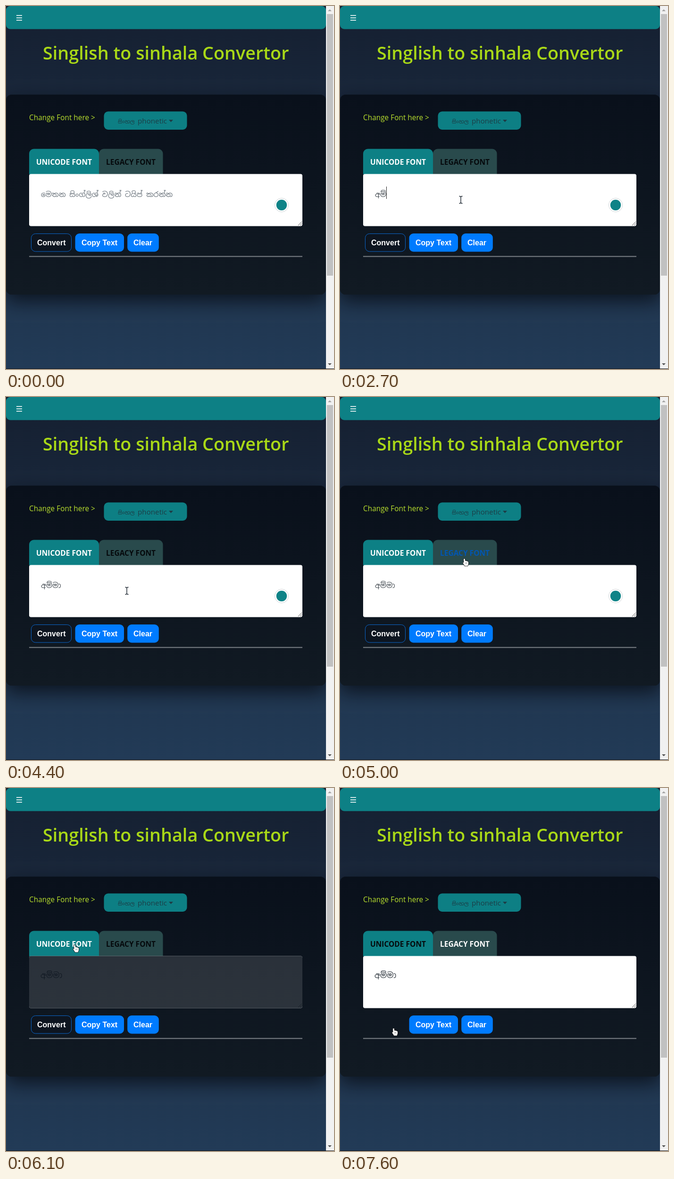
Animation of 695 by 766 pixels, one loop 8000 ms. Source, as an HTML page with a canvas:

```html
<!DOCTYPE html>
<html lang="en">
<head>
<meta charset="utf-8">
<title>Singlish to sinhala Convertor</title>
<style>
html, body { margin: 0; width: 100%; height: 100%; overflow: hidden; background: #16202f; }
canvas { display: block; width: 695px; height: 766px; }
</style>
</head>
<body>
<canvas id="stage" width="695" height="766"></canvas>
<script>
const ctx = document.getElementById('stage').getContext('2d');
const LOOP = 8000, STEP = 100;
const SANS = '"Open Sans", "Noto Sans", sans-serif';
const ARIAL = '"Liberation Sans", Arial, sans-serif';
const SINHALA = '"Noto Sans Sinhala", "Noto Sans", sans-serif';
const TEAL = '#0d8085', BLUE = '#007bff';
const CARD = vertical(187, 609, '#09101b', '#111a23');

// Pointer stops: time, x, y; straight eased moves between them
const PATH = [
  [500, 352, 742], [600, 340, 690], [800, 336, 672], [1100, 259, 414], [1600, 256, 409],
  [4400, 256, 409], [5000, 265, 349], [5500, 265, 349], [5800, 147, 339],
  [6200, 147, 339], [6800, 117, 511], [6900, 115, 515], [8000, 115, 515]
];
const TYPED = [[2600, 'අ'], [2700, 'අම්'], [3000, 'අම්ම්'], [3200, 'අම්ම'], [3400, 'අම්මා']];
const SWITCHES = [[5300, 'legacy'], [6000, 'unicode'], [7400, 'legacy']];
const CLICKED = 2200, FADE_OUT = 114, FADE_IN = 86;

const last = (list, t) => list.filter(e => e[0] <= t).pop();

function rect(x, y, w, h, r, fill, stroke) {
  ctx.beginPath();
  ctx.roundRect(x, y, w, h, r);
  if (fill) { ctx.fillStyle = fill; ctx.fill(); }
  if (stroke) { ctx.strokeStyle = stroke; ctx.lineWidth = 1; ctx.stroke(); }
}

function circle(x, y, r, fill, stroke) {
  rect(x - r, y - r, 2 * r, 2 * r, r, fill, stroke);
}

function text(str, x, y, font, color) {
  ctx.font = font;
  ctx.fillStyle = color;
  ctx.fillText(str, x, y);
  return ctx.measureText(str).width;
}

function poly(points, fill) {
  ctx.beginPath();
  points.forEach(([x, y]) => ctx.lineTo(x, y));
  ctx.closePath();
  ctx.fillStyle = fill;
  ctx.fill();
}

function line(x1, y1, x2, y2, color, width) {
  ctx.beginPath();
  ctx.moveTo(x1, y1);
  ctx.lineTo(x2, y2);
  ctx.strokeStyle = color;
  ctx.lineWidth = width;
  ctx.stroke();
}

function vertical(y1, y2, a, b) {
  const g = ctx.createLinearGradient(0, y1, 0, y2);
  g.addColorStop(0, a);
  g.addColorStop(1, b);
  return g;
}

function page() {
  ctx.fillStyle = vertical(0, 766, '#151f30', '#223b57');
  ctx.fillRect(0, 0, 695, 766);

  ctx.save();
  ctx.shadowColor = 'rgba(5, 10, 18, 0.75)';
  ctx.shadowBlur = 38;
  ctx.shadowOffsetY = 14;
  rect(0, 187, 678, 422, 12, '#0b121d');
  ctx.restore();
  rect(0, 187, 678, 422, 12, CARD);

  rect(0, 0, 678, 48.7, 9, TEAL);
  for (const y of [20, 25, 30]) line(22, y, 34, y, '#fff', 1.6);
  text('Singlish to sinhala Convertor', 78, 113, '600 37.75px ' + SANS, '#a9d817');
  text('Change Font here >', 49, 241, '15.4px ' + SANS, '#b9e02e');

  rect(207.5, 222.5, 176, 38.5, 9, '#0d7f84');
  text('සිංහල', 237, 248, '11.5px ' + SINHALA, '#1d3c45');
  text('phonetic', 279, 248, '15.2px ' + SANS, '#1d3c45');
  poly([[345, 240], [354, 240], [349.5, 245]], '#1d3c45');

  line(49, 528.5, 628, 528.5, '#7b8086', 2);
}

function scrollbar() {
  ctx.fillStyle = '#f1f1f1';
  ctx.fillRect(678, 0, 17, 766);
  ctx.fillStyle = '#c1c1c1';
  ctx.fillRect(680, 17, 13, 552);
  poly([[682, 11], [690, 11], [686, 7]], '#a3a3a3');
  poly([[682, 754], [690, 754], [686, 758]], '#505050');
  ctx.fillStyle = '#10151c';
  ctx.fillRect(0, 765, 695, 1);
}

function tabs(tab, hover) {
  rect(49, 301.6, 148, 53.4, [10, 10, 0, 0], TEAL);
  rect(197, 301.6, 135.5, 53.4, [10, 10, 0, 0], '#294a4c');
  const color = name => tab === name ? '#fff' : hover === name ? '#0056b3' : '#05090c';
  text('UNICODE FONT', 64, 335, 'bold 15.5px ' + SANS, color('unicode'));
  text('LEGACY FONT', 212, 335, 'bold 15.5px ' + SANS, color('legacy'));
}

function unicodeText(t) {
  const font = '15.5px ' + SINHALA;
  const typed = last(TYPED, t);
  let w = 0;
  if (typed) w = text(typed[1], 74, 403, font, '#495057');
  else text('මෙතන සිංග්ලිශ් වලින් ටයිප් කරන්න', 74, 403, font, '#6c757d');
  const since = t - (typed ? typed[0] : CLICKED);
  if (t >= CLICKED && t < SWITCHES[0][0] && since % 1060 < 530) {
    ctx.fillStyle = '#222';
    ctx.fillRect(Math.round(74 + w), 381, 1, 26);
  }
  circle(584, 420, 14.5, '#fff', '#cfd5d8');
  circle(584, 420, 11.2, '#0f8387');
}

function pane(name, alpha, t) {
  rect(49, 354.6, 579, 109.8, 4, '#fff');
  for (const d of [8, 4]) line(627 - d, 463, 627, 463 - d, '#555', 1);
  if (name === 'legacy') text('අම්මා', 73, 401, '16.8px ' + SINHALA, '#343c44');
  else unicodeText(t);

  // Fade the pane as a whole by covering it with the card
  ctx.save();
  ctx.globalAlpha = 1 - alpha;
  rect(49, 354.6, 579, 109.8, 4, CARD);
  ctx.restore();
}

function buttons(tab, hover) {
  const font = 'bold 16px ' + ARIAL;
  if (tab === 'unicode') {
    rect(53.5, 480.5, 85, 37.5, 9, hover ? BLUE : '#0d1520', '#0a66cc');
    text('Convert', 66, 505, font, '#fff');
  }
  rect(146.6, 480, 103.4, 38.4, 9, BLUE);
  text('Copy Text', 160, 505, font, '#fff');
  rect(257.2, 480, 66.6, 38.4, 9, BLUE);
  text('Clear', 270, 505, font, '#fff');
}

function pointer(t) {
  const from = last(PATH, t);
  if (!from || (t >= 3400 && t < 4400)) return null;
  const to = PATH.find(p => p[0] > t) || from;
  const k = to === from ? 0 : (t - from[0]) / (to[0] - from[0]);
  const e = k * k * (3 - 2 * k);
  return { x: from[1] + (to[1] - from[1]) * e, y: from[2] + (to[2] - from[2]) * e };
}

const inside = (p, x, y, w, h) => p && p.x >= x && p.x < x + w && p.y >= y && p.y < y + h;

function cursor(p, kind) {
  ctx.save();
  ctx.translate(Math.round(p.x), Math.round(p.y));
  ctx.lineJoin = 'round';
  let shape;
  if (kind === 'beam') {
    shape = new Path2D('M-3.5-7.5h2l1.5 1.5 1.5-1.5h2M0-6V6M-3.5 7.5h2l1.5-1.5 1.5 1.5h2');
    ctx.strokeStyle = '#18222c';
    ctx.lineWidth = 1.4;
    ctx.stroke(shape);
  } else {
    shape = new Path2D(kind === 'hand'
      ? 'M-3-7q1.5-1.5 3 0v4q1.5-1 2.5.4 1.5-.8 2.5.6 2-.5 2 1.5v4l-1.5 4h-6l-4-6q-.5-2 2-1z'
      : 'M0 0V16l4-4 3 6 2.5-1-3-6H12z');
    ctx.strokeStyle = '#111';
    ctx.lineWidth = 1.6;
    ctx.stroke(shape);
    ctx.fillStyle = '#fff';
    ctx.fill(shape);
    if (kind === 'hand') for (const x of [1, 3.5]) line(x, 0, x, 3, '#444', 0.7);
  }
  ctx.restore();
}

function draw(t) {
  const swap = last(SWITCHES, t);
  const tab = swap ? swap[1] : 'unicode';
  const p = pointer(t);
  const overUnicode = inside(p, 49, 302, 148, 53);
  const overLegacy = inside(p, 197, 302, 136, 53);
  const overConvert = inside(p, 53, 480, 86, 38);

  page();
  tabs(tab, overLegacy ? 'legacy' : overUnicode ? 'unicode' : '');

  // Old pane fades out, then the new one fades in
  const dt = swap ? t - swap[0] : LOOP;
  if (dt < FADE_OUT) pane(tab === 'legacy' ? 'unicode' : 'legacy', 1 - dt / FADE_OUT, t);
  else pane(tab, Math.min(1, (dt - FADE_OUT) / FADE_IN), t);

  buttons(tab, overConvert);
  scrollbar();
  if (p) {
    const hand = overUnicode || overLegacy || overConvert;
    cursor(p, hand ? 'hand' : inside(p, 49, 355, 579, 109) ? 'beam' : 'arrow');
  }
}

let shown = -1;
const start = performance.now();
function frame(now) {
  const t = Math.floor(Math.max(0, now - start) % LOOP / STEP) * STEP;
  if (t !== shown) draw(shown = t);
  requestAnimationFrame(frame);
}
draw(0);
requestAnimationFrame(frame);
</script>
</body>
</html>
```
